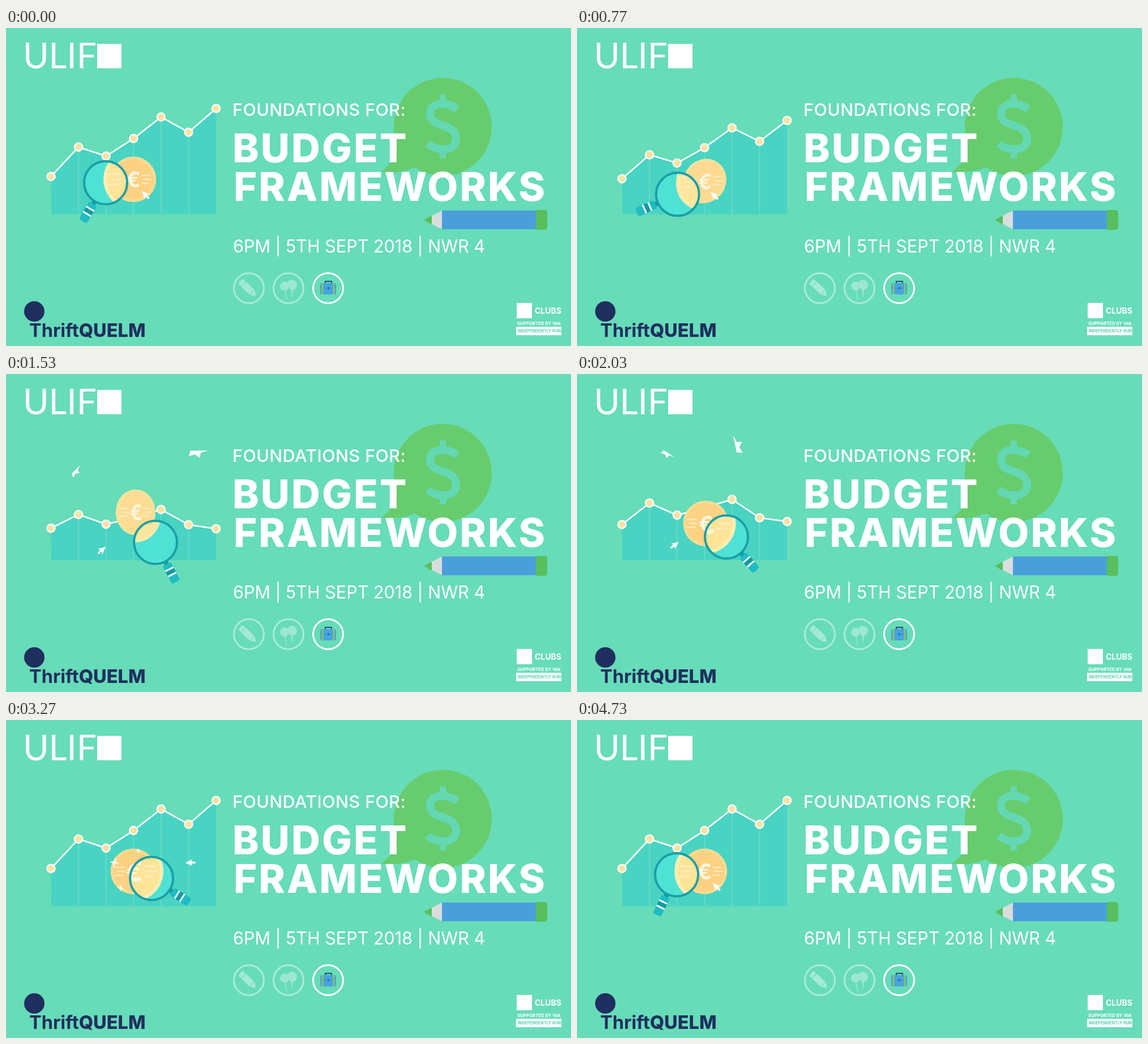
An HTML page that plays this animation: 998x561 px, repeating every 4.76 s.

```html
<!DOCTYPE html>
<html lang="en">
<head>
<meta charset="utf-8">
<title>Budget talk banner</title>
<style>
  html, body { margin: 0; width: 100%; height: 100%; overflow: hidden; background: #67dcb8; }
  svg { display: block; width: 100vw; height: 100vh; }
  text { font-family: Inter, sans-serif; fill: #fff; }
</style>
</head>
<body>
<svg viewBox="0 0 998 561">
  <rect width="998" height="561" fill="#67dcb8"/>

  <!-- speech bubble -->
  <g fill="#67cc6d">
    <ellipse cx="771.5" cy="174.5" rx="86.5" ry="86.5"/>
    <path d="M690 205C688 228 680 241 662 254C685 256 706 254 728 243Z"/>
  </g>
  <g fill="none" stroke="#64d8b3" stroke-width="14">
    <path d="M797 143C789 137 780 134 770 134C757 134 749 140 749 151C749 164 760 168 772 172C787 177 795 183 795 196C795 208 785 214 772 214C761 214 752 210 745 204"/>
    <path d="M771.5 117V134M771.5 214V230" stroke-width="11"/>
  </g>

  <!-- pencil -->
  <path d="M738 338.5L770 322V355Z" fill="#d9dddc"/>
  <path d="M738 338.5L752 331V347Z" fill="#56bf5c"/>
  <rect x="770" y="322" width="167" height="33" fill="#4a9fda"/>
  <path d="M936 321H951Q956 321 956 326V351Q956 356 951 356H936Z" fill="#58bf5e"/>

  <!-- headings -->
  <text x="400" y="155" font-size="30.5" font-weight="500" letter-spacing=".4">FOUNDATIONS FOR:</text>
  <g font-size="70.5" font-weight="800" letter-spacing="3">
    <text x="400" y="237">BUDGET</text>
    <text x="402" y="305">FRAMEWORKS</text>
  </g>
  <text x="401" y="396" font-size="30.5">6PM | 5TH SEPT 2018 | NWR 4</text>

  <!-- round icons -->
  <g fill="none" stroke="#fff" stroke-width="3">
    <circle cx="429" cy="459" r="26.5" opacity=".45"/>
    <circle cx="499" cy="459" r="26.5" opacity=".45"/>
    <circle cx="569" cy="459" r="26.5"/>
  </g>
  <g fill="#fff">
    <g transform="translate(427 459) rotate(43)" opacity=".4">
      <rect x="-18" y="-6" width="7" height="12" rx="3"/>
      <rect x="-10" y="-6" width="20" height="12"/>
      <path d="M11-6L20 0L11 6Z"/>
    </g>
    <g opacity=".35">
      <path d="M500 456A8 8 0 1 1 497 449A9 9 0 1 1 507 462L505 478L504 462A9 9 0 0 1 500 458Z"/>
      <path d="M493 463L496 478" stroke="#fff" stroke-width="1.5"/>
    </g>
  </g>
  <path d="M564 451V447H575V451" fill="none" stroke="#2b4a78" stroke-width="2"/>
  <rect x="555" y="450" width="28" height="20" rx="2" fill="#45a5e0"/>
  <path d="M555 457Q569 462 583 457" fill="none" stroke="#3a8fce" stroke-width="1.2"/>
  <path d="M559 450V470M579 450V470" stroke="#8fc35a" stroke-width="3"/>
  <rect x="568" y="457" width="3" height="4" fill="#2f70b0"/>

  <!-- sponsor marks -->
  <text x="30" y="71" font-size="62" style="font-family:Lato,sans-serif">ULIF</text>
  <rect x="161" y="28" width="43" height="43" fill="#fff"/>
  <circle cx="50" cy="500" r="18" fill="#1f2f5f"/>
  <text x="41" y="545" font-size="32.5" font-weight="700" style="fill:#1f2f5f">Thrift<tspan font-weight="800">QUELM</tspan></text>
  <rect x="902" y="485" width="27" height="27" fill="#fff"/>
  <text x="934" y="504" font-size="14" font-weight="700">CLUBS</text>
  <text x="903" y="524" font-size="7.8" font-weight="700">SUPPORTED BY Vok</text>
  <rect x="901" y="527" width="80" height="15" rx="1" fill="#fff"/>
  <text x="904" y="537.3" font-size="7.1" font-weight="700" style="fill:#58cfae">INDEPENDENTLY RUN</text>

  <g id="scene"></g>
</svg>
<script>
const LOOP = 4760, BASE = 328.5;
const scene = document.getElementById('scene');
const HIGH = [262, 210, 226, 195, 157, 184, 142];
const LOW = [272, 248, 265, 254, 239, 266, 273];

const clamp = x => Math.min(1, Math.max(0, x));
const ramp = (t, from, to) => clamp((t - from) / (to - from));
// ease from 0 to 1
const ease = (t, from, to) => (1 - Math.cos(Math.PI * ramp(t, from, to))) / 2;
const cubic = (t, from, to) => {
  const x = ramp(t, from, to);
  return x < .5 ? 4 * x ** 3 : 1 - 4 * (1 - x) ** 3;
};
// ease from 0 to 1 and back
const bump = (t, from, to) => Math.sin(Math.PI * ramp(t, from, to)) ** 2;
const place = (x, y, turn = 0, size = 1) =>
  `transform="translate(${x} ${y}) rotate(${turn}) scale(${size})"`;

function chart(t) {
  const pts = HIGH.map((y, i) => {
    const drop = ease(t, 334 + i * 29, 1334 + i * 29);
    const rise = cubic(t, 1530 + i * 40, 2430 + i * 40);
    return [79.5 + i * 48.6, y + (LOW[i] - y) * (drop - rise)];
  });
  const line = pts.map(p => p.join(' ')).join('L');
  const bars = pts.slice(1, 6).map(p => `M${p.join(' ')}V${BASE}`).join('');
  return `<path d="M${line}V${BASE}H80Z" fill="#49d3c2"/>
    <path d="${bars}" stroke="#63dcc7" stroke-width="2"/>
    <path d="M${line}" fill="none" stroke="#fff" stroke-width="2.6"/>` +
    pts.map(([x, y]) => `<circle cx="${x}" cy="${y}" r="7" fill="#fde2a0" stroke="#fff" stroke-width="2.4"/>`).join('');
}

// four stars light up one after another around the coin
function sparks(t) {
  let out = '';
  for (let i = 0; i < 4; i++) {
    const from = 2375 + i * 320, r = 8.5 * Math.sin(Math.PI * ramp(t, from, from + 1250));
    if (r < .1) continue;
    const a = (127 + i * 78) * Math.PI / 180, q = r * .25;
    out += `<path ${place(37 * Math.cos(a), 37 * Math.sin(a), 8)} fill="#fff8e4"
      d="M0 ${-r}L${q} ${-q}L${r} 0L${q} ${q}L0 ${r}L${-q} ${q}L${-r} 0L${-q} ${-q}Z"/>`;
  }
  return out;
}

function coin(t, size, rim, face) {
  const x = 225 + 5 * bump(t, 400, 2600);
  const y = 267 + 4 * bump(t, 400, 1000) - 23 * bump(t, 850, 2200);
  const spin = 4 * Math.PI * cubic(t, 400, 2200);
  const wide = Math.max(.04, Math.abs(Math.cos(spin))), edge = Math.abs(Math.sin(spin));
  const axis = 35 * Math.cos(Math.PI * (t - 770) / 1520);
  return `<g ${place(x, y, 0, size)}>
    <g transform="rotate(${axis})">
      <ellipse cx="${-edge * 4}" rx="${40 * wide}" ry="40" fill="#fde5a8"/>
      <g transform="scale(${wide} 1) rotate(${-axis})">
        <circle r="40" fill="${rim}"/><circle r="35.5" fill="${face}"/>
        <circle r="40" fill="#fee6a4" opacity="${edge}"/>
        <path d="M-34-7H-16M-29 0H-15M-34 7H-18M15-7H30M17 0H33M14 7H27" stroke="#fdeabd" stroke-width="2.6"/>
        <text y="14" font-size="38" font-weight="700" text-anchor="middle" style="fill:#fff6e0">€</text>
      </g>
    </g>${sparks(t)}</g>`;
}

function glass(t) {
  const x = 176 + 88 * (ease(t, 700, 1500) - ease(t, 3017, 4421));
  const y = 273 + 24 * ease(t, 100, 1000) - 17 * ease(t, 1600, 2400) -
    7 * ease(t, 3017, 4421) + 11 * bump(t, 3270, 4420);
  // the handle's last swing runs on into the next loop
  const swing = s => 132 * ease(s, 3930, 5200);
  const turn = 24 + swing(t) + swing(t + LOOP) - 104 * ease(t, 770, 1730) - 28 * ramp(t, 1730, 3930);
  return `<clipPath id="lens"><circle cx="${x}" cy="${y}" r="38"/></clipPath>
    <g ${place(x, y, turn)}>
      <rect x="38" y="-4" width="8" height="8" fill="#1797a3"/>
      <rect x="43" y="-8" width="36" height="16" rx="4" fill="#20bcc3"/>
      <rect x="52" y="-8" width="13" height="16" fill="#1599a6"/>
      <path d="M53.5-8V8M64-8V8" stroke="#fff" stroke-width="3"/>
    </g>
    <g clip-path="url(#lens)">
      <circle cx="${x}" cy="${y}" r="38" fill="#4fe7da" opacity=".8"/>
      ${coin(t, 1.32, '#fdeeb2', '#fde496')}
    </g>
    <circle cx="${x}" cy="${y}" r="38" fill="none" stroke="#1a9fa6" stroke-width="4"/>`;
}

function planes(t) {
  const size = ramp(t, 1100, 1250) * (1 - ramp(t, 2550, 2690));
  if (!size) return '';
  const u = (t - 1530) / 940, a = .37 + 1.9 * u;
  const shape = 'fill="#fff" d="M17-5H-14L-17 5L-6 1.5L2 8L4-1Z"';
  return `<path ${place(270 + 75 * Math.cos(a), 150 - 27 * Math.sin(a), -192 * u, size)} ${shape}/>
    <path ${place(125 + 65 * u, 172 + 20 * u - 40 * Math.sin(Math.PI * u), 145 * u - 45, size * .7)} ${shape}/>`;
}

function cursor(t) {
  const x = 240 - 70 * bump(t, 600, 2900) + 82 * bump(t, 2250, 4690);
  const y = 288 + 17 * bump(t, 600, 2500) - 36 * bump(t, 2500, 4000);
  const turn = 110 * bump(t, 700, 2900) - 60 * bump(t, 2500, 4700) - 135;
  return `<path ${place(x, y, turn)} fill="#fff" d="M0 0L-13-6L-10.5-1.7H-18V1.7H-10.5L-13 6Z"/>`;
}

function draw(now) {
  const t = now % LOOP;
  scene.innerHTML = chart(t) + coin(t, 1, '#fddb90', '#fcd182') + glass(t) + planes(t) + cursor(t);
}

const start = performance.now();
function tick() {
  draw(performance.now() - start);
  requestAnimationFrame(tick);
}
tick();
</script>
</body>
</html>
```
